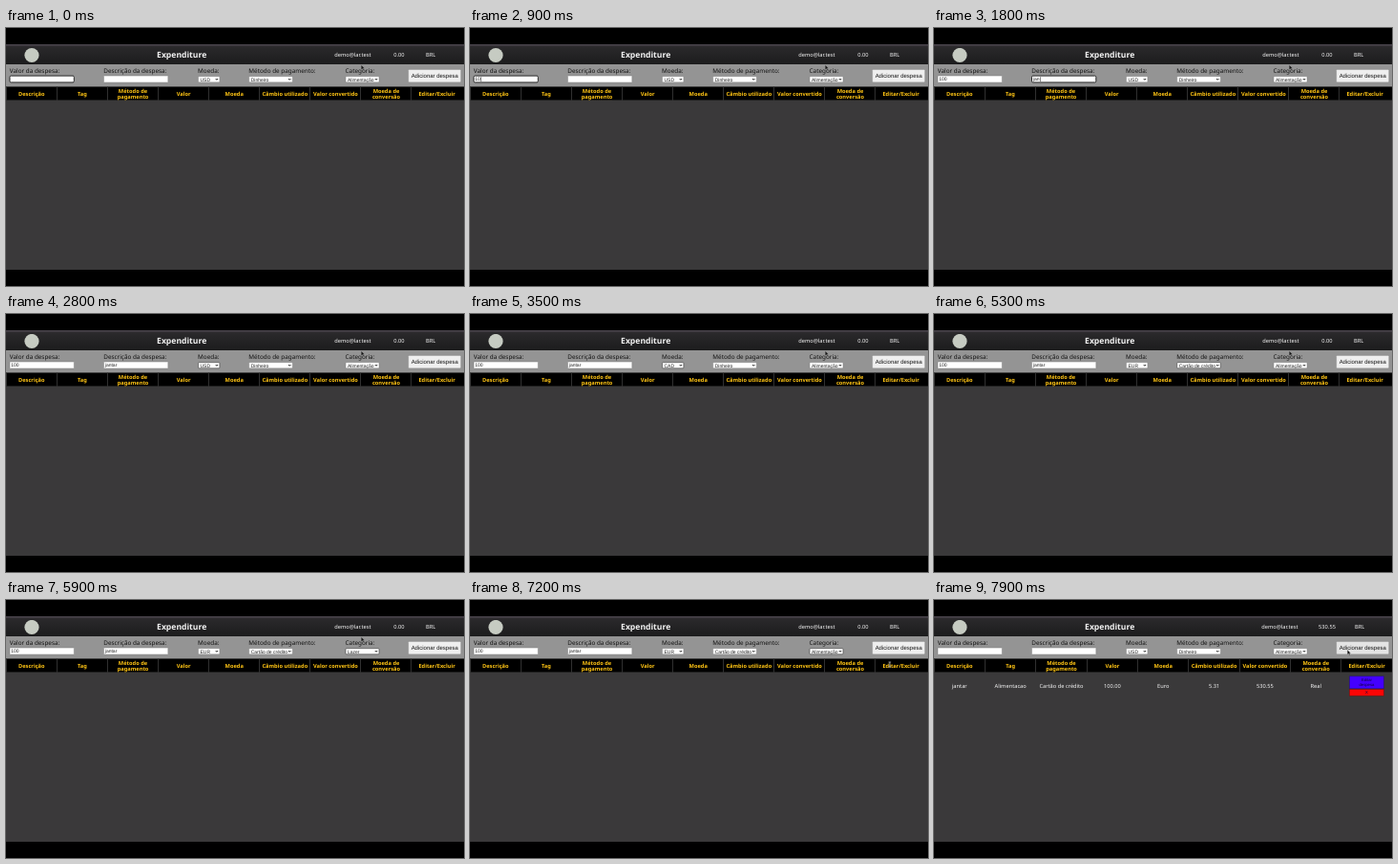
Animation, 480 px wide and 270 px high, one loop 8000 ms. Source, as an HTML page:

```html
<!DOCTYPE html>
<html lang="pt-BR">
<head>
<meta charset="utf-8">
<title>Expenditure</title>
<style>
  html, body { margin: 0; width: 100%; height: 100%; overflow: hidden; background: #000; }
  svg { display: block; width: 100vw; height: 100vh; }
  text { font: 5.7px "Noto Sans", "Open Sans", sans-serif; fill: #f4f4f4; text-rendering: geometricPrecision; white-space: pre; }
  .mid { text-anchor: middle; }
  .title { font-size: 8.6px; font-weight: 700; }
  .head { font-weight: 700; fill: #ffc414; }
  .label { font-size: 6.35px; fill: #111; }
  .field { font: 5px "Liberation Sans", Arial, sans-serif; fill: #222; }
  .button { font: 5.97px "Liberation Sans", Arial, sans-serif; fill: #111; }
  .tiny { font: 4.2px "Liberation Sans", Arial, sans-serif; fill: #120040; }
</style>
</head>
<body>
<svg viewBox="0 0 480 270" preserveAspectRatio="none">
  <defs>
    <linearGradient id="bar" x2="0" y2="1">
      <stop offset="0" stop-color="#302d31"/>
      <stop offset=".2" stop-color="#29282a"/>
      <stop offset="1" stop-color="#1c1c1d"/>
    </linearGradient>
  </defs>
  <rect width="480" height="270"/>
  <rect y="17" width="480" height="21" fill="url(#bar)"/>
  <rect y="17" width="480" height="1.6" fill="#48424a"/>
  <rect y="38" width="480" height="23.5" fill="#949494"/>
  <rect y="76" width="480" height="177" fill="#3a393a"/>
  <circle cx="27" cy="28.5" r="7.6" fill="#c6cbc2"/>
  <g id="page"></g>
</svg>
<script>
const LOOP = 8000, SAVED = 7700;
const page = document.getElementById('page');

const HEADERS = ['Descrição', 'Tag', 'Método de|pagamento', 'Valor', 'Moeda',
  'Câmbio utilizado', 'Valor convertido', 'Moeda de|conversão', 'Editar/Excluir'];
const ROW = ['jantar', 'Alimentacao', 'Cartão de crédito', '100.00', 'Euro', '5.31', '530.55', 'Real'];

const AMOUNT_KEYS = [600, 800, 1000];
const NAME_KEYS = [1500, 1600, 1700, 1900, 2000, 2100];
const FOCUS = [[0, 'amount'], [1200, 'name'], [2300, 'currency'], [4200, 'method'], [5400, 'tag'], [7500, '']];
const CURRENCY = [[0, 'USD'], [3500, 'CAD'], [3700, 'EUR'], [SAVED, 'USD']];
const METHOD = [[0, 'Dinheiro'], [5300, 'Cartão de crédito'], [SAVED, 'Dinheiro']];
const TAG = [[0, 'Alimentação'], [5900, 'Lazer'], [6400, 'Alimentação']];

const stepAt = (steps, t) => steps.filter(s => s[0] <= t).pop()[1];
const typed = (word, keys, t) => t < SAVED ? word.slice(0, keys.filter(k => k <= t).length) : '';
const text = (x, y, cls, value) => `<text x="${x}" y="${y}" class="${cls}">${value}</text>`;
const rect = (x, y, w, h, fill, extra = '') =>
  `<rect x="${x}" y="${y}" width="${w}" height="${h}" fill="${fill}" ${extra}/>`;

function input(x, w, label, value, focused, caretOn) {
  // Liberation Sans digits and most lowercase letters advance about 0.556 em
  const narrow = (value.match(/[jtr]/g) || []).length;
  const caretX = x + 1.7 + value.length * 2.78 - narrow * 1.4;
  const border = focused ? 'rx="1.2" stroke="#161616" stroke-width=".9"' : 'rx=".5" stroke="#777" stroke-width=".4"';
  return text(x - .2, 47.3, 'label', label) +
    rect(x, 50.1, w, 6.8, '#fff', border) +
    text(x + 1.3, 55.3, 'field', value) +
    (focused && caretOn ? rect(caretX, 51.2, .5, 4.8, '#111') : '');
}

function select(x, w, label, value, focused) {
  const arrowX = x + w - 4.2;
  const border = focused ? 'stroke="#3c3c3c" stroke-width=".6"' : 'stroke="#777" stroke-width=".4"';
  return text(x - .4, 47.3, 'label', label) +
    rect(x, 50.7, w, 6.1, '#fff', 'rx=".8" ' + border) +
    text(x + 2, 55.5, 'field', value) +
    `<path d="M${arrowX} 53l1.2 1.3 1.2-1.3" fill="none" stroke="#111" stroke-width=".9"/>`;
}

function table(saved) {
  const step = saved ? 53.35 : 53.1;
  const center = i => 26.8 + step * i;
  const grid = '#303030';
  let out = rect(0, 61.3, 480, .5, grid) + rect(0, 75.3, 480, .7, grid);
  out += HEADERS.map((name, i) => {
    const lines = name.split('|');
    const y = lines.length > 1 ? 67.6 : 70.8;
    return rect(Math.floor(step * i), 61.5, 1, 14.5, grid) +
      lines.map((line, n) => text(center(i), y + n * 6.4, 'head mid', line)).join('');
  }).join('');
  if (saved) {
    out += ROW.map((value, i) => text(center(i), 92.1, 'mid', value)).join('') +
      rect(435.3, 79.8, 36.2, 13, '#4400ff', 'stroke="#26166a" stroke-width=".6"') +
      rect(435.3, 93.4, 36.2, 6.8, '#fb0505', 'stroke="#6a1414" stroke-width=".6"') +
      text(453.4, 85.4, 'tiny mid', 'Editar') + text(453.4, 90.2, 'tiny mid', 'despesa') +
      text(453.4, 98.2, 'tiny mid', 'X');
  }
  return out;
}

function cursor(t) {
  if (t >= 7200 && t < 7300)
    return '<path d="M438.6 65h2.6M438.6 70h2.6M439.9 65v5" stroke="#bbb" stroke-width=".8"/>';
  const [x, y] = t < 7200 ? [372.3, 38.8] : [433.3, 52.2];
  return `<path d="M${x} ${y}v4.8l1.1-1 .8 1.7.8-.4-.8-1.6h1.5z" fill="#111" stroke="#ccc" stroke-width=".2"/>`;
}

function draw(t) {
  const saved = t >= SAVED;
  const focus = stepAt(FOCUS, t);
  const lastKey = Math.max(0, ...[...AMOUNT_KEYS, ...NAME_KEYS, 1200].filter(k => k <= t));
  const caretOn = t >= 100 && (t - lastKey) % 1000 < 500;
  const shift = saved ? -1 : 0;
  return text(184.2, 31, 'title mid', 'Expenditure') +
    text(344.3 + shift, 30.2, '', 'demo@lar.test') +
    text(412, 30.2, 'mid', saved ? '530.55' : '0.00') +
    text(440 - shift, 30.2, '', 'BRL') +
    input(4, 67.3, 'Valor da despesa:', typed('100', AMOUNT_KEYS, t), focus === 'amount', caretOn) +
    input(102.5, 67.3, 'Descrição da despesa:', typed('jantar', NAME_KEYS, t), focus === 'name', caretOn) +
    select(201.5, 22.4, 'Moeda:', stepAt(CURRENCY, t), focus === 'currency') +
    select(254.7, 45.6, 'Método de pagamento:', stepAt(METHOD, t), focus === 'method') +
    select(356, 35, 'Categoria:', stepAt(TAG, t), focus === 'tag') +
    rect(421.7, 43.4, 55, 13.4, t >= 7300 ? '#e4e4e4' : '#efefef', 'rx=".8" stroke="#777" stroke-width=".3"') +
    text(449.2, 52.1, 'button mid', 'Adicionar despesa') +
    table(saved) + cursor(t);
}

let shown = '';
const start = performance.now();
function frame() {
  const next = draw((performance.now() - start) % LOOP);
  if (next !== shown) page.innerHTML = shown = next;
  requestAnimationFrame(frame);
}
frame();
</script>
</body>
</html>
```
